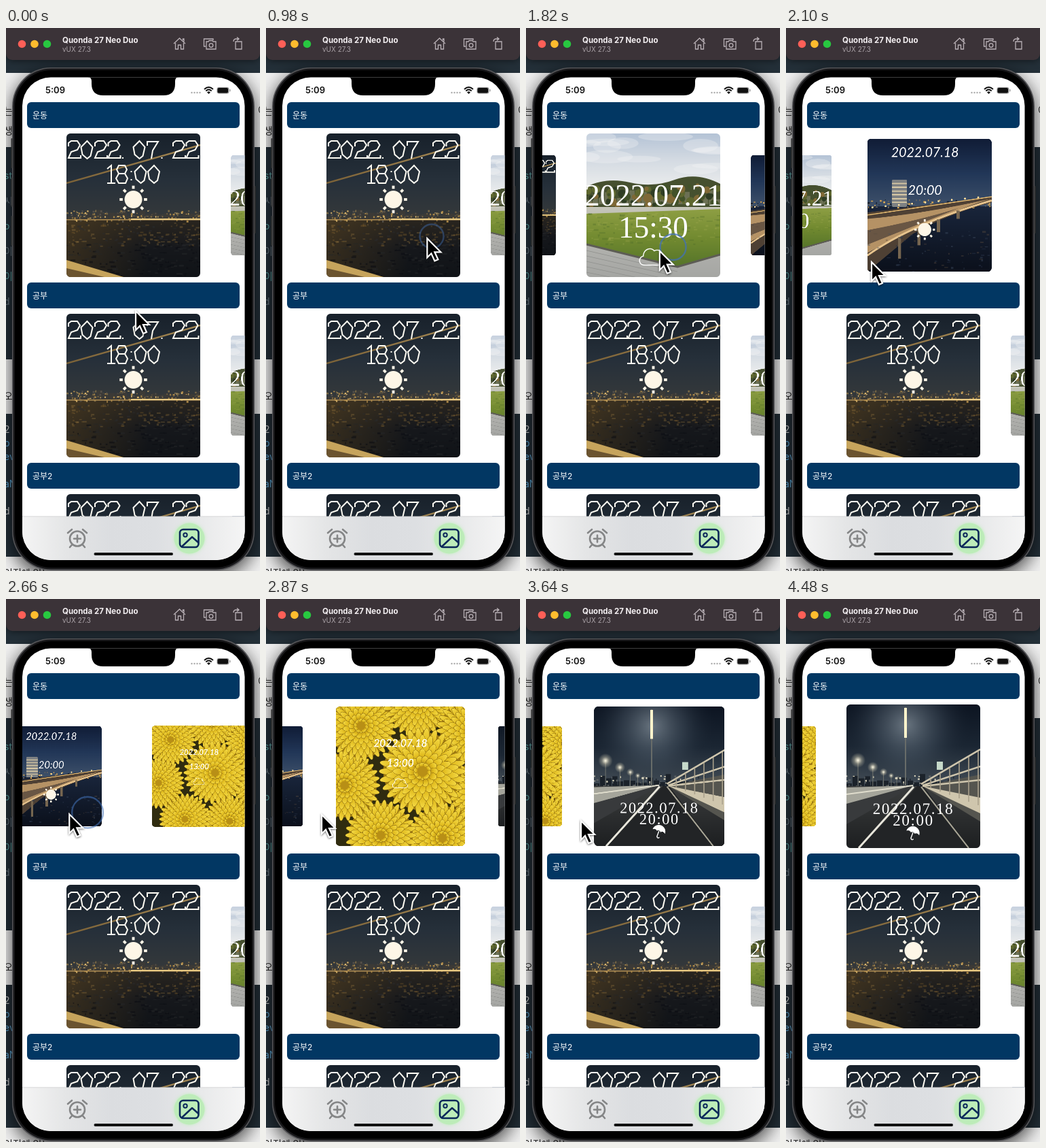
Write an HTML page with a canvas that moves like this. It is 374 by 798 pixels and loops after 4550 ms.

```html
<!DOCTYPE html>
<html lang="ko">
<head>
<meta charset="utf-8">
<title>Photo carousel</title>
<style>
html, body { margin: 0; width: 100%; height: 100%; overflow: hidden; background: #222e36; }
canvas { display: block; width: 374px; height: 798px; }
</style>
</head>
<body>
<canvas id="stage" width="374" height="798"></canvas>
<script>
const LOOP = 4550, STEP = 70, GAP = 212.7, CARD_W = 197, CARD_H = 211, MID = 187.5;
const UI = 'Inter, "Noto Sans CJK KR", "Noto Sans CJK", sans-serif';
const SERIF = '"Liberation Serif", serif';
const HAND = 'Lato, sans-serif';
const stage = document.getElementById('stage').getContext('2d');
let g = stage;

const clamp = u => Math.max(0, Math.min(1, u));
const smooth = u => u * u * (3 - 2 * u);
const settle = u => 1 - (1 - clamp(u)) ** 3;
function times(n, draw) {
  for (let i = 0; i < n; i++) draw(i);
}
function seeded(n) {
  return () => (n = n * 16807 % 2147483647) / 2147483647;
}

// drawing helpers, all acting on the current context g
function box(x, y, w, h, r, fill) {
  g.beginPath(); g.roundRect(x, y, w, h, r);
  if (fill) { g.fillStyle = fill; g.fill(); }
}
function oval(x, y, rx, ry, fill) {
  g.beginPath(); g.ellipse(x, y, rx, ry, 0, 0, 7); g.fillStyle = fill; g.fill();
}
function disc(x, y, r, fill) {
  oval(x, y, r, r, fill);
}
function circle(x, y, r, line, width) {
  g.beginPath(); g.arc(x, y, r, 0, 7);
  g.strokeStyle = line; g.lineWidth = width; g.stroke();
}
function shape(d, fill, line, width = 1) {
  const p = new Path2D(d);
  if (fill) { g.fillStyle = fill; g.fill(p); }
  if (line) { g.strokeStyle = line; g.lineWidth = width; g.stroke(p); }
}
function label(s, x, y, font, fill = '#fff', align = 'left') {
  g.font = font; g.fillStyle = fill; g.textAlign = align; g.fillText(s, x, y);
}
function stops(gradient, colors) {
  colors.forEach((c, i) => gradient.addColorStop(i / (colors.length - 1), c));
  return gradient;
}
const fall = (y0, y1, ...colors) => stops(g.createLinearGradient(0, y0, 0, y1), colors);
const across = (x0, x1, ...colors) => stops(g.createLinearGradient(x0, 0, x1, 0), colors);
const glow = (x, y, r, ...colors) => stops(g.createRadialGradient(x, y, 0, x, y, r), colors);
function placed(x, y, turn, scale, draw) {
  g.save(); g.translate(x, y); g.rotate(turn); g.scale(scale, scale); draw(); g.restore();
}

function sun(x, y, r) {
  disc(x, y, r, '#fdf6e7');
  times(8, i => placed(x, y, i * Math.PI / 4, r, () => g.fillRect(1.2, -.15, .36, .3)));
}
function cloud(x, y, s) {
  placed(x, y, 0, s, () => shape('M-14 11C-23 10-23-1-15-3C-15-13-4-18 2-11C9-15 17-8 14-2C23 0 23 11 13 11Z', null, '#fff', 1.5));
}
// small random flecks inside a band: city lights, ripples, leaves
function flecks(seed, n, y, h, w, colors) {
  const rnd = seeded(seed);
  times(n, i => {
    g.fillStyle = colors[i % colors.length];
    g.fillRect(rnd() * CARD_W, y + rnd() * h, 1 + rnd() * w, 1 + rnd() * 2);
  });
}
function towers(seed, base, h, color) {
  const rnd = seeded(seed);
  g.fillStyle = color;
  for (let x = 0; x < CARD_W; x += 9) {
    const top = h * (.3 + .7 * rnd());
    g.fillRect(x, base - top, 8, top);
  }
}

// angular display lettering
const GLYPHS = {
  0: 'M9 0L17 9L14 22L9 26L2 20L0 9Z',
  1: 'M1 5L7 0V26M1 26H13',
  2: 'M1 8V3L5 0H14L18 6L14 13L5 16L1 25H19V21',
  7: 'M1 7V1H17L9 14L7 26',
  8: 'M4 0H13L16 6L13 12H4L1 6ZM4 12L0 19L4 26H14L17 19L13 12',
  '.': 'M2 25H4',
  ':': 'M3 8V10M3 20V22'
};
function angular(s, x, y) {
  for (const c of s) {
    if (GLYPHS[c]) placed(x, y, 0, 1, () => shape(GLYPHS[c], null, '#fffdf4', 2));
    x += c === ' ' ? 10.5 : c === '1' ? 14 : '.:'.includes(c) ? 8 : 19.5;
  }
}
function stamp(date, y1, time, y2, font, size) {
  label(date, 98.5, y1, `${font[0]} ${size}px ${font[1]}`, '#fff', 'center');
  label(time, 98.5, y2, `${font[0]} ${size}px ${font[1]}`, '#fff', 'center');
}

function harbour() {
  box(0, 0, 197, 132, 0, fall(0, 132, '#18212b', '#26303a', '#373a3b'));
  box(0, 128, 197, 83, 0, fall(128, 211, '#29251f', '#16181c', '#101317'));
  box(0, 128, 120, 83, 0, across(0, 120, '#7a5a2455', '#7a5a2400'));
  towers(8, 128, 19, '#3c3a36');
  flecks(17, 150, 112, 16, 2, ['#7d6a45', '#a98647', '#54504a', '#d8b56c']);
  flecks(23, 170, 131, 34, 5, ['#8a682e55', '#2a2c3088', '#b9904a44']);
  flecks(31, 160, 160, 50, 7, ['#24262988', '#0a0d1188']);
  box(0, 126, 197, 1.5, 0, '#b08b4c');
  box(95, 125, 102, 2, 0, '#eacb83');
  shape('M0 73L197 17', null, across(0, 197, '#7c6237', '#a68a55'), 2.3);
  shape('M0 186L84 211H0Z', '#6b5430');
  shape('M0 186L84 211H56L0 198Z', '#c6a45c');
  angular('2022. 07. 22', 2, 11);
  angular('18:00', 59, 47);
  sun(98.5, 97, 13);
}

function park() {
  box(0, 0, 197, 112, 0, fall(0, 75, '#b4c3d6', '#d3dae2', '#e9ebec'));
  const rnd = seeded(12);
  times(14, () => oval(rnd() * 197, rnd() * 60, 18 + rnd() * 25, 4 + rnd() * 6, '#f5f6f64d'));
  shape('M0 78Q30 64 64 72T130 68T197 74V112H0Z', '#46502f');
  towers(19, 104, 22, '#a5a08d66');
  times(70, i => disc(rnd() * 197, 76 + rnd() * 30, 2 + rnd() * 5, ['#2f3d24', '#5e672f', '#7f6936', '#425229'][i % 4]));
  box(0, 108, 197, 103, 0, fall(108, 211, '#c5c5b9', '#b3b3af', '#a5a6a3'));
  shape('M0 118L197 111V177L134 195L0 162Z', fall(112, 195, '#8d9e43', '#728a30', '#56752a'));
  flecks(3, 150, 116, 46, 8, ['#a4ae5544', '#4d692755']);
  shape('M0 163L134 196L197 178', null, '#5d5c55', 3);
  times(7, i => shape(`M0 ${172 + i * 8}L${134 - i * 10} ${203 + i * 5}`, null, '#8f908d', .7));
  stamp('2022.07.21', 106, '15:30', 153, ['', SERIF], 45);
  cloud(98, 183, .95);
}

function bridge() {
  box(0, 0, 197, 112, 0, fall(0, 112, '#101c36', '#223758', '#41536b'));
  box(0, 107, 197, 104, 0, fall(107, 211, '#19253b', '#0b101b'));
  flecks(41, 80, 96, 12, 3, ['#18202e', '#dca850', '#68635d']);
  box(39, 65, 24, 43, 2, '#7e8183');
  times(6, i => box(39, 70 + i * 6, 24, 2, 0, '#d8c9a5'));
  shape('M0 117L197 92V101Q128 119 72 151L0 211Z', '#4e4034');
  shape('M0 127Q90 119 197 95Q116 119 0 181Z', '#b59265');
  shape('M0 145Q80 130 145 110L0 168Z', '#695644');
  shape('M0 185Q68 136 197 98', null, '#e6c38d', 3);
  shape('M0 121L197 92', null, '#e9bd71', 1.5);
  times(4, i => shape(`M${51 + i * 31} ${156 - i * 14}v${34 - i * 7}`, null, '#766650', 5));
  times(9, i => disc(8 + i * 21, 109 - i * 2, 1.5, '#ffe2a0'));
  flecks(71, 70, 145, 66, 5, ['#42506866', '#5a4d4066', '#26324688']);
  placed(-7, 0, 0, 1, () => stamp('2022.07.18', 29, '20:00', 89, ['italic', HAND], 21));
  sun(91, 144, 10.5);
}

function bloom(x, y, r) {
  disc(x, y, r * .9, '#a27d12');
  times(6, ring => {
    const reach = r * (1 - ring * .16), n = 30 - ring * 4;
    times(n, i => placed(x, y, (i + ring * .5) * 2 * Math.PI / n, 1, () => {
      oval(reach * .72, 0, reach * .28, r * .08, across(reach * .44, reach, '#b98f14', '#e2bd20', '#f3d844'));
      g.strokeStyle = '#8a690f'; g.lineWidth = .5; g.stroke();
    }));
  });
  disc(x, y, r * .12, '#b88f16');
}
function flower() {
  box(0, 0, 197, 211, 0, '#302c10');
  times(7, i => {
    const a = (i + .3) * 2 * Math.PI / 7;
    bloom(120 + 108 * Math.cos(a), 100 + 108 * Math.sin(a), 54);
  });
  bloom(132, 98, 66);
  stamp('2022.07.18', 61, '13:00', 91, ['italic 600', HAND], 16);
  cloud(98, 117, .55);
}

function road() {
  box(0, 0, 197, 122, 0, fall(0, 122, '#0d1522', '#1b2633', '#465059'));
  box(0, 0, 197, 122, 0, glow(88, 30, 95, '#95a2acaa', '#52606e66', '#1b263300'));
  towers(6, 122, 20, '#1b222a');
  flecks(11, 90, 104, 18, 2, ['#d9d4bd', '#5d6264', '#191f27']);
  box(0, 120, 197, 91, 0, fall(120, 211, '#3b3d3d', '#1d1f21'));
  shape('M0 122L98 119L0 146Z', '#a5a59b');
  shape('M0 146L98 120L0 176Z', '#383a3c');
  shape('M0 132L98 119', null, '#e0ddcd', 2);
  shape('M104 120H113L182 211H22Z', '#222426');
  shape('M18 211L99 121', null, '#e8e6db', 3);
  shape('M110 121L180 211', null, '#aaa797', 2);
  shape('M112 120L197 103V172Z', '#55554f');
  shape('M112 120L197 137V160Z', '#cfc6ad');
  shape('M110 117L197 66M112 119L197 91M112 120L197 111', null, '#cfc6ad', 2.5);
  times(6, i => shape(`M${124 + i * 14} ${109 - i * 8}V${123 + i * 5}`, null, '#aaa18c', 1.6));
  shape('M87 4V120', null, '#686c69', 2);
  shape('M87 5V49', null, '#fff4cc', 4);
  times(5, i => {
    const near = .72 ** i, x = 95 - 78 * near, y = 118 - 36 * near;
    shape(`M${x} ${y}V120`, null, '#72756f');
    disc(x, y, 11 * near, glow(x, y, 11 * near, '#fffbe8', '#fff5d355', '#fff5d300'));
  });
  box(133, 84, 9, 12, 0, '#c6d9ca');
  g.letterSpacing = '1.6px';
  stamp('2022.07.18', 161, '20:00', 178, ['', SERIF], 23);
  g.letterSpacing = '0px';
  placed(98, 188, .35, 1, () => {
    shape('M-10 1A10 10 0 0 1 10 1Q6-2 3 1Q0-2-3 1Q-6-2-10 1Z', '#fff');
    shape('M0 0V9Q2 12 4 9', null, '#fff', 1.4);
  });
}

const cards = [harbour, park, bridge, flower, road].map(draw => {
  const c = document.createElement('canvas');
  c.width = CARD_W * 2; c.height = CARD_H * 2;
  g = c.getContext('2d');
  g.scale(2, 2);
  box(0, 0, CARD_W, CARD_H, 6); g.clip();
  draw();
  g = stage;
  return c;
});

function row(title, top, pos) {
  box(31, top, 313, 38, 6, '#023763');
  label(title, 39, top + 23.5, `12px ${UI}`);
  cards.forEach((card, i) => {
    const x = MID + (i - pos) * GAP;
    const s = 1 - .3 * clamp(Math.abs(x - MID) / 98);
    const w = CARD_W * s, h = CARD_H * s;
    if (x + w / 2 > 24 && x - w / 2 < 351) g.drawImage(card, x - w / 2, top + 151.5 - h / 2, w, h);
  });
}

function lines(words, y, gap, ...colors) {
  words.forEach((s, i) => label(s, -3, y + i * gap, `14px ${UI}`, colors[i % colors.length]));
}
function desktop() {
  box(0, 0, 374, 798, 0, '#243039');
  box(0, 66, 374, 109, 0, '#f1f1f1');
  box(0, 487, 374, 80, 0, '#f1f1f1');
  box(0, 777, 374, 21, 0, '#f1f1f1');
  lines(['는', '생'], 127, 29, '#222');
  lines(['오'], 546, 0, '#222');
  lines(['이전에 있는'], 806, 0, '#222');
  lines(['st', '시', 'o', '이', '이', 'd'], 222, 37, '#5da6a5', '#6c7982');
  lines(['2', 'b', 'ev', '', 'aN', '', 'd'], 595, 20, '#ccc', '#5da6d5', '#5da6d5');
  label('어', 371, 126, `14px ${UI}`, '#222');
}

function titleBar() {
  g.save();
  g.shadowColor = '#0009'; g.shadowBlur = 12;
  box(0, -10, 374, 57, 9, '#3b3338');
  g.restore();
  ['#ff5f57', '#febc2e', '#28c840'].forEach((c, i) => disc(23.5 + i * 18.5, 23.5, 5.8, c));
  label('Quonda 27 Neo Duo', 83, 22, `700 11.5px ${UI}`, '#f4f0f2');
  label('vUX 27.3', 83, 35, `10px ${UI}`, '#aaa2a7');
  const ink = '#b9b1b6';
  shape('M247 23L255.5 15L264 23M249.5 22V31H253.5V25H257.5V31H261.5V22M260.5 18V16H262V20', null, ink, 1.3);
  shape('M294 27H291.5V16H305V18M295 20H298L299 18.5H304L305 20H309V31H295Z', null, ink, 1.3);
  circle(302, 25.5, 2.8, ink, 1.3);
  shape('M338 20H347V31H338ZM335 20Q335 16 339 16H342M340 13.5L343 16L340 18.5', null, ink, 1.3);
}

function statusBar() {
  label('5:09', 58, 96, `600 13px ${UI}`, '#111');
  times(4, i => disc(273.5 + i * 4, 95, 1.2, '#aaa'));
  shape('M292 90Q298.5 84 305 90M294.3 92.5Q298.5 88.7 302.7 92.5', null, '#111', 1.9);
  shape('M296 94.5Q298.5 92 301 94.5L298.5 97Z', '#111');
  box(310.5, 87, 18, 9.5, 3, '#999');
  box(311.5, 88, 15.5, 7.5, 2, '#111');
  box(329.3, 90, 1.3, 3.5, 1, '#999');
}

function tabBar() {
  const gray = '#858687', navy = '#0b2859';
  box(24, 718, 328, 64, 0, across(24, 352, '#f4f4f4', '#e4e5e6', '#dbdde0', '#dddfe2', '#e8e9ea', '#f5f5f5'));
  box(24, 717.5, 328, .7, 0, '#c9c9cb');
  g.lineCap = g.lineJoin = 'round';
  circle(105, 750.5, 11, gray, 2.6);
  shape('M105 745.5V755.5M100 750.5H110M91 742L97 737M119 742L113 737M97.5 759L94 763M112.5 759L116 763', null, gray, 2.6);
  g.save(); g.shadowColor = '#bdf0ba'; g.shadowBlur = 5;
  disc(270, 750, 22.5, '#bdecb9'); g.restore();
  box(256, 737, 27.5, 26, 5);
  g.strokeStyle = navy; g.lineWidth = 2.6; g.stroke();
  circle(264, 745, 2.7, navy, 2);
  shape('M259 762L274 748L283 756', null, navy, 2.5);
  g.lineCap = 'butt'; g.lineJoin = 'miter';
  box(129.5, 771, 116.5, 4, 2, '#111');
}

function phone(pos) {
  g.save();
  g.shadowColor = '#000b'; g.shadowBlur = 28; g.shadowOffsetY = 8;
  box(9, 58, 357, 739, 57, '#555558');
  g.restore();
  times(3, i => box(7.5, 162 + i * 57, 2, 44, 1, '#333'));
  box(365.5, 232, 2, 70, 1, '#333');
  box(10.5, 59.5, 354, 736, 56, '#171719');
  box(13, 62, 349, 731, 54, '#000');
  g.save();
  box(24, 72.5, 327.5, 709.5, 42, '#fff'); g.clip();
  ['운동', '공부', '공부2'].forEach((s, i) => row(s, 109 + i * 265, i ? 0 : pos));
  tabBar();
  statusBar();
  shape('M120 72Q126 72 126 78V82Q126 99 143 99H232Q249 99 249 82V78Q249 72 255 72Z', '#000');
  g.restore();
}

// each swipe drags the pointer from one point to another
const SWIPES = [
  { at: 1040, from: [244, 306], to: [153, 333] },
  { at: 1830, from: [225, 320], to: [125, 343] },
  { at: 2540, from: [215, 308], to: [81, 316] },
  { at: 3300, from: [211, 300], to: [80, 325] }
];
const LEAD = 110, DRAG = 280, REST = 190, SLIDE = 520;
const PATH = [
  { at: 280, p: [190, 415] },
  ...SWIPES.flatMap(({ at, from, to }) => [
    { at: at - LEAD, p: from },
    { at: at - LEAD + DRAG, p: to },
    { at: at - LEAD + DRAG + REST, p: to }
  ]),
  { at: 4200, p: [-40, 480] }
];
const scrollAt = t => SWIPES.reduce((sum, s) => sum + settle((t - s.at) / SLIDE), 0);
function pointerAt(t) {
  let [x, y] = PATH[0].p;
  for (let i = 1; i < PATH.length; i++) {
    const a = PATH[i - 1], b = PATH[i], u = smooth(clamp((t - a.at) / (b.at - a.at)));
    x += (b.p[0] - a.p[0]) * u;
    y += (b.p[1] - a.p[1]) * u;
  }
  return [x, y];
}

function pointer(t) {
  for (const { at } of SWIPES) {
    const u = clamp((t - at + LEAD) / 300);
    g.globalAlpha = .85 * Math.sin(Math.PI * u);
    circle(...pointerAt(t - 50), 16 + 9 * u, '#4271b8', 2.4);
  }
  g.globalAlpha = 1;
  placed(...pointerAt(t), 0, 1, () => {
    g.shadowColor = '#0007'; g.shadowBlur = 3; g.shadowOffsetY = 1;
    shape('M1 1V29L7 23L12 34L17 32L12 21H21Z', '#000', '#fff', 2.2);
  });
}

function frame(now) {
  const t = Math.floor(now % LOOP / STEP) * STEP;
  desktop();
  phone(scrollAt(t));
  titleBar();
  pointer(t);
  requestAnimationFrame(frame);
}
requestAnimationFrame(frame);
</script>
</body>
</html>
```
